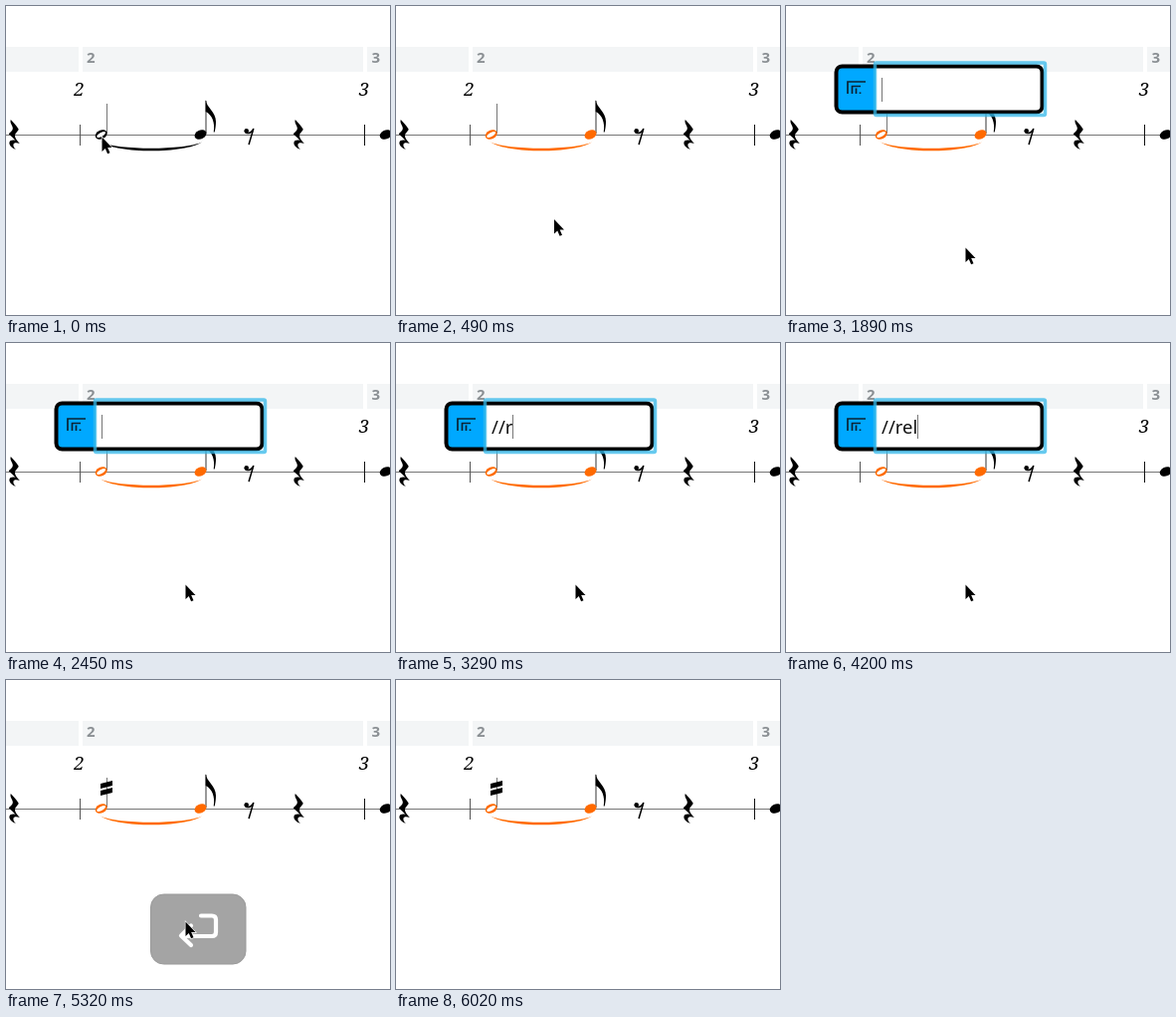
Recreate the animation shown at these times as an HTML page. Size 386 by 310 pixels, loop 6.23 s.

```html
<!DOCTYPE html>
<html lang="en">
<head>
<meta charset="utf-8">
<title>Tremolo popover</title>
<style>
  html, body { margin: 0; width: 100%; height: 100%; overflow: hidden; background: #fff; }
  svg { display: block; }
  .ruler { font: 600 15px "Noto Sans", sans-serif; fill: #8b9094; }
  .bar { font: italic 18.5px "Noto Serif", serif; text-anchor: middle; }
  .entry { font: 18.5px "Noto Sans", sans-serif; fill: #111; }
  .line { fill: none; stroke-linecap: round; stroke-linejoin: round; }
  .sel { fill: var(--note); }
</style>
</head>
<body>
<svg id="stage" width="386" height="310" viewBox="0 0 386 310">
  <defs>
    <path id="rest" d="M-3.2-15C0-11.5 2.5-9 4.6-5.5C5.2-4.3 1.5-2 1 .8C.8 3.5 3 6 5.8 9C3 8-.3 7.8-.6 10C-.8 12 .4 13.5 1.8 15C-2 13.5-5 10.5-4.6 8C-4.2 5.5-.8 5.2 1.6 6C-.5 3.5-3 1.5-5.2-.5C-4.6-2-1-3.5-1.2-6.5C-1.3-9.5-4.5-11.5-3.2-15Z"/>
    <ellipse id="head" rx="6.2" ry="4.5" transform="rotate(-24)"/>
    <path id="slash" d="M95 4L107 1V6L95 9Z"/>
  </defs>

  <path fill="#f3f5f6" d="M0 41H73V66H0ZM77 41H359V66H77ZM363 41H386V66H363Z"/>
  <g class="ruler"><text x="81" y="57">2</text><text x="367.5" y="57">3</text></g>
  <g class="bar"><text x="73.5" y="90">2</text><text x="360" y="90">3</text></g>

  <path d="M0 129.5H386" stroke="#777"/>
  <path d="M74.5 119V140" stroke="#555"/>
  <path d="M360.5 119V140" stroke="#111"/>
  <use href="#rest" x="8" y="129"/>
  <use href="#rest" x="294" y="129"/>
  <circle cx="241.7" cy="125.3" r="2.3"/>
  <path class="line" d="M241 127Q245.5 129 248.7 123.5L244.2 138.5" stroke="#000" stroke-width="1.5"/>

  <path d="M101.5 98V128" stroke="#777"/>
  <path d="M201 95V128" stroke="#555" stroke-width="1.2"/>
  <path d="M200.7 94C201.5 102 211 106 211 116C211 120 210.4 124 209.7 126.5H208.7C210.5 117 207 109 200.7 106Z"/>
  <g class="sel">
    <use href="#head" x="95.7" y="129"/>
    <use href="#head" x="195.5" y="129"/>
    <path d="M95 136.5C112 144.8 180 144.8 197 136.5C180 148.2 112 148.2 95 136.5Z"/>
  </g>
  <ellipse rx="4.9" ry="1.9" transform="translate(95.7 129) rotate(-30)" fill="#fff"/>
  <use href="#head" x="381.7" y="129"/>
  <g id="tremolo"><use href="#slash" y="100"/><use href="#slash" y="107"/></g>

  <g id="popover">
    <rect x="51" y="60" width="207" height="46.5" rx="5" fill="#fff"/>
    <path d="M90 60H56Q51 60 51 65V101.500Q51 106.500 56 106.500H90Z" fill="#00a8ff"/>
    <rect x="50.500" y="60.500" width="207" height="46" rx="6" fill="none" stroke="#000" stroke-width="4"/>
    <rect x="89.500" y="57" width="171" height="52.500" rx="1.500" fill="none" stroke="#35b9ea" stroke-opacity=".75" stroke-width="3.500"/>
    <path d="M62 88V76H80M66.500 88V80.500H75M70.500 82.500V88M74.500 86.500V88" fill="none" stroke="#0b2233" stroke-width="1.700"/>
    <text id="entry" class="entry" x="96" y="91"></text>
    <path id="caret" d="M0 72V96" stroke="#777"/>
  </g>

  <g id="key">
    <rect x="145.500" y="215" width="95.500" height="70" rx="13" fill="#4a4a4a" stroke="#363636"/>
    <path class="line" d="M196 236.500H207Q211 236.500 211 240.500V253Q211 257 207 257H177M186 246.500L176 256.500L186 266" stroke="#fff" stroke-width="4.200"/>
  </g>

  <path id="cursor" d="M0 0V14.500L3.300 11.400L5.600 16.800L8 15.800L5.700 10.500H10Z" stroke="#fff" stroke-width="1.300" paint-order="stroke"/>
</svg>
<script>
  const LOOP = 6230;
  const SELECT = 140, OPEN = 1890, CLOSE = 4480, HIDE_CURSOR = 5950;
  const KEYSTROKES = [2660, 2870, 3220, 3430, 3710];
  const $ = id => document.getElementById(id);
  const ramp = (t, from, to) => Math.min(1, Math.max(0, (t - from) / (to - from)));
  const smooth = p => p * p * (3 - 2 * p);
  const show = (id, on) => $(id).style.display = on ? "" : "none";

  function draw(t) {
    $("stage").style.setProperty("--note", t < SELECT ? "#000" : "#ff6a00");

    const p = smooth(ramp(t, 210, 630));
    $("cursor").setAttribute("transform", `translate(${96.5 + 84 * p} ${131.5 + 111 * p})`);
    show("cursor", t < HIDE_CURSOR);

    show("popover", t >= OPEN && t < CLOSE);
    $("entry").textContent = "//rel".slice(0, KEYSTROKES.filter(k => t >= k).length);
    const width = $("entry").getComputedTextLength();
    $("caret").setAttribute("transform", `translate(${Math.round(96 + width) + 0.5})`);

    show("tremolo", t >= CLOSE);
    $("key").style.opacity = ramp(t, 4235, 4520) - ramp(t, 5160, 5480);
  }

  function tick() {
    draw(performance.now() % LOOP);
    requestAnimationFrame(tick);
  }
  tick();
</script>
</body>
</html>
```
